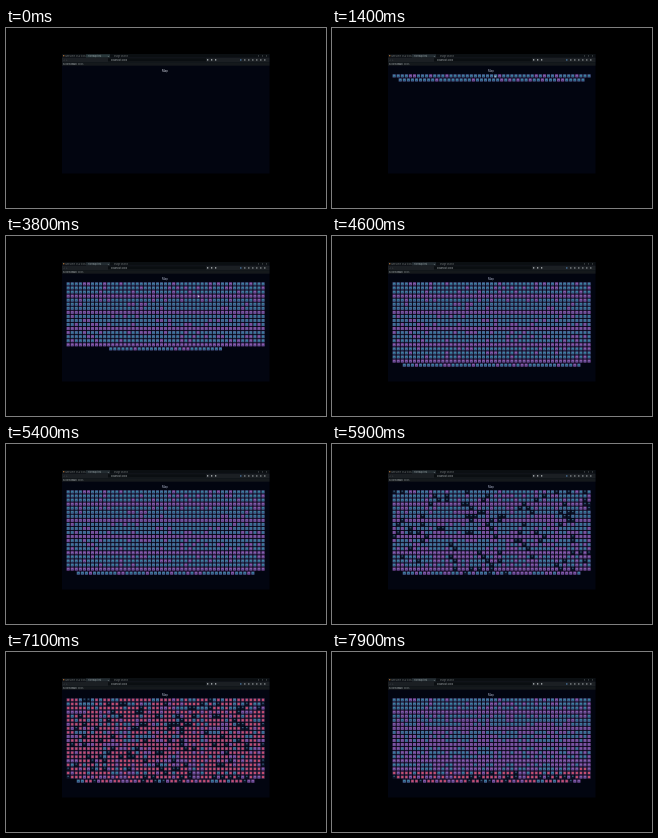
Animation of 320 by 180 pixels, one loop 8 s. Source, as an HTML page with a canvas:

```html
<!DOCTYPE html>
<html lang="en">
<head>
<meta charset="utf-8">
<title>Tile map</title>
<style>
html, body { margin: 0; width: 100%; height: 100%; overflow: hidden; background: #000; }
canvas { display: block; width: 320px; height: 180px; }
</style>
</head>
<body>
<canvas id="stage" width="320" height="180"></canvas>
<script>
const ctx = document.getElementById('stage').getContext('2d');
const LOOP = 8000, COLS = 49, TOTAL = 1024, PITCH = 4.06;

const clamp = v => Math.max(0, Math.min(1, v));
const ramp = (t, a, b) => clamp((t - a) / (b - a));
const ease = v => v * v * (3 - 2 * v);

function rand(i, salt) {
  const v = Math.sin(i * 12.9898 + salt * 78.233) * 43758.5453;
  return v - Math.floor(v);
}

function rect(x, y, w, h, color) {
  ctx.fillStyle = color;
  ctx.fillRect(x, y, w, h);
}

function label(text, x, y, size, color, align = 'left') {
  ctx.font = size + 'px Inter, Arial, sans-serif';
  ctx.textAlign = align;
  ctx.textBaseline = 'middle';
  ctx.fillStyle = color;
  ctx.fillText(text, x, y);
}

function drawBrowser(t) {
  rect(0, 0, 320, 180, '#000');
  rect(56, 26, 207.5, 119.5, '#020510');
  rect(56, 26, 207.5, 3.5, '#0b0f12');
  rect(80, 26.3, 24, 3.4, t < 100 ? '#29383b' : '#232c31');
  rect(56, 29.5, 207.5, 4.7, '#1b1f23');
  rect(56, 34.2, 207.5, 3.5, '#15191c');
  rect(102, 30.2, 98, 3.3, '#0a0e11');

  rect(57, 27, 1.4, 1.4, '#986535');
  label('Awesome CSS tools', 59, 28, 2.2, '#73777a');
  label('Tile map test', 82, 28, 2.2, '#9ba6a8');
  label('Image search', 108, 28, 2.2, '#73777a');
  label('×', 101.5, 28, 2.5, '#9ba6a8');
  label('‹  ›', 57.5, 31.8, 3, '#60666a');
  label('localhost:3000', 105, 31.9, 2.3, '#b5babd');
  for (const x of [201, 205, 209]) rect(x, 31.1, 1.3, 1.5, '#a1a7aa');
  for (let i = 0; i < 7; i++) {
    rect(234 + i * 4, 31.2, 1.5, 1.5, i === 0 ? '#456b91' : '#757b7e');
  }
  label('Bookmarks', 57, 36, 2.2, '#90979a');
  label('Mail', 66.5, 36, 2.2, '#90979a');
  label('Docs', 72, 36, 2.2, '#90979a');
  for (const x of [252, 256, 260]) rect(x, 27.6, 1, 0.7, '#70767a');
  label('Map', 159, 42.7, 2.8, t < 900 ? '#d2d6e2' : '#adb5cb', 'center');
}

function tileState(i, t) {
  const restored = ramp(t, 7180, 8020) * TOTAL;
  if (i < restored) return 'blue';
  if (rand(i, 3) < 0.58 * ramp(t, 6450, 7050)) return 'red';
  if (rand(i, 5) < 0.29 * ramp(t, 5600, 6350)) return 'dark';
  return 'blue';
}

function drawTile(x, y, i, row, t) {
  const state = tileState(i, t);
  const fade = ramp(t, 5500, 6300);
  const magenta = row % 4 === 3 || rand(i, 8) < 0.18 + fade * row / 35;
  if (state === 'dark') {
    rect(x, y, 3.2, 3.2, '#10172d');
    rect(x + 0.8, y + 0.3, 1.6, 1.1, '#365f7c');
    return;
  }
  if (state === 'red') {
    rect(x, y, 3.2, 3.2, '#603666');
    rect(x + 0.6, y + 0.6, 2, 2, '#c64f70');
    return;
  }
  rect(x, y, 3.2, 3.2, magenta ? '#704594' : '#4c588f');
  rect(x + 0.55, y + 0.55, 2.1, 2.1, magenta ? '#885caa' : '#3d83a0');
  rect(x + 1, y + 1.8, 1.2, 0.6, '#253e6c');
}

function drawGrid(t) {
  if (t < 1200) return;
  const count = Math.min(TOTAL, Math.floor(424 + (t - 2500) * 388 / 1300));
  for (let i = 0; i < count; i++) {
    const row = Math.floor(i / COLS);
    const inRow = Math.min(COLS, count - row * COLS);
    const x = 159.6 + (i % COLS - inRow / 2) * PITCH + 0.43;
    const y = 46.3 + row * PITCH;
    drawTile(x, y, i, row, t);
  }
}

function drawCursor(t) {
  if (t < 1200 || t > 4300) return;
  const away = ease(ramp(t, 1250, 2050));
  const back = ease(ramp(t, 3050, 3700));
  const x = 160 + 28 * away + 4 * back;
  const y = 43 + 46 * away - 30 * back;
  ctx.fillStyle = '#c5cad3';
  ctx.beginPath();
  ctx.moveTo(x, y);
  ctx.lineTo(x + 1.7, y + 1.7);
  ctx.lineTo(x, y + 2.3);
  ctx.fill();
}

function frame(now) {
  const t = now % LOOP;
  drawBrowser(t);
  drawGrid(t);
  drawCursor(t);
  requestAnimationFrame(frame);
}
requestAnimationFrame(frame);
</script>
</body>
</html>
```
